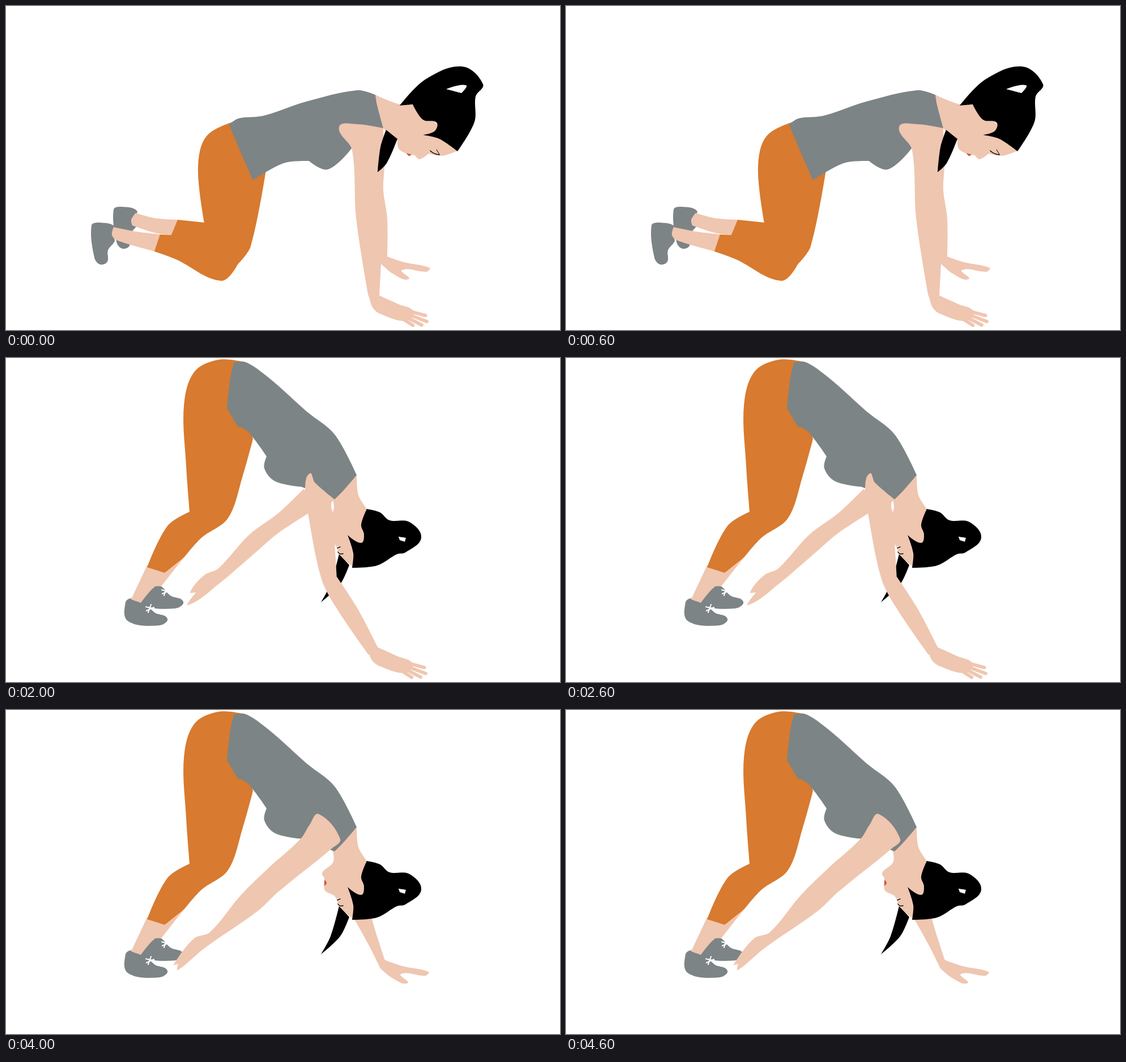
These frames come from a looping animation (978 px wide and 573 px high, 5 s). An HTML page:

```html
<!DOCTYPE html>
<html lang="en">
<head>
<meta charset="utf-8">
<title>Plank exercise</title>
<style>
html, body { margin: 0; width: 100%; height: 100%; overflow: hidden; background: #fff; }
svg { display: block; width: 978px; height: 573px; }
</style>
</head>
<body>
<svg id="stage" viewBox="0 0 978 573"></svg>
<script>
const GREY = '#7c8486', ORANGE = '#d87a2f', SKIN = '#efc6b0', BLACK = '#000', WHITE = '#fff', LIPS = '#c9573f';

// Closed smooth outline through a few "x,y" key points; a trailing "!" makes a corner.
function outline(text) {
  const pts = text.trim().split(/\s+/).map(s => {
    const [x, y] = s.replace('!', '').split(',').map(Number);
    return { x, y, corner: s.endsWith('!') };
  });
  const n = pts.length;
  const handle = (i, length) => {
    const p = pts[i], a = pts[(i + n - 1) % n], b = pts[(i + 1) % n];
    const k = p.corner ? 0 : length / 3 / Math.hypot(b.x - a.x, b.y - a.y);
    return `${p.x + (b.x - a.x) * k},${p.y + (b.y - a.y) * k}`;
  };
  const curves = pts.map((p, i) => {
    const j = (i + 1) % n, q = pts[j], length = Math.hypot(q.x - p.x, q.y - p.y);
    return `C${handle(i, length)} ${handle(j, -length)} ${q.x},${q.y}`;
  });
  return `M${pts[0].x},${pts[0].y}${curves.join('')}Z`;
}

const shape = (fill, pts) => `<path fill="${fill}" d="${outline(pts)}"/>`;
const line = (color, width, d) =>
  `<path fill="none" stroke="${color}" stroke-width="${width}" stroke-linecap="round" d="${d}"/>`;
const move = (transform, art) => `<g transform="${transform}">${art}</g>`;
const shift = (x, y, art) => move(`translate(${x} ${y})`, art);
const laces = (x, y) => shift(x, y, line(WHITE, 2, 'M-7,-3L7,1M-6,4L7,-2M2,-7L-3,7'));

// Four fingers fan out from the wrist, the middle ones longest.
function fingers(x, y) {
  return [0, 1, 2, 3].map(i => {
    const angle = (33 - 6 * i) * Math.PI / 180, reach = 73 + 19 * Math.sin(i * Math.PI / 4);
    const at = r => `${x + r * Math.cos(angle)},${y + r * Math.sin(angle)}`;
    return line(SKIN, 6, `M${at(48)}L${at(reach)}`);
  }).join('');
}
const nearHand = shape(SKIN, '638,508! 645,533 660,545 704,557 718,541 690,527 657,512!') + fingers(655, 525);
const farHand = shape(SKIN, '662,438! 671,443! 700,453 746,463 740,470 697,467 709,483 682,474 660,456!');
const hands = farHand + nearHand;

const sideHead =
  shape(SKIN, `652,157! 695,174 722,174! 768,215! 797,256! 770,265 746,261! 730,271 722,264! 707,261
    693,252 691,235! 670,220 640,190!`) +
  shape(BLACK, `695,176! 740,130 805,107 842,138 829,160 827,205 797,257! 765,235 736,228! 757,221
    760,206 736,201 718,174!`) +
  shape(WHITE, '777,147! 812,140 804,154!') +
  shape(LIPS, '707,260! 716,263! 711,265') +
  line(BLACK, 1.4, 'M749,256Q755,262 765,263') +
  line(BLACK, 1, 'M760,254L765,262');

const sideTorso = shape(GREY, `394,210! 410,199 455,194 530,169 620,149 652,157! 655,175 666,216! 610,252!
  568,289 535,274! 490,278 436,308! 420,272`);

const pair = (shoe, x, y, between) => shift(x, y, shoe) + between + shoe;

const kneeling =
  pair(shape(GREY, '151,388 165,383 192,390 187,404 192,415 180,432 179,452 166,457 156,445'), 39, -28,
    shape(SKIN, '229,366! 262,375 303,378! 293,405! 262,401 223,388! 221,378')) +
  shape(SKIN, '190,391! 230,399 273,404! 263,434! 195,414 187,404') +
  shape(ORANGE, `410,202! 355,229 339,285 350,383! 303,378! 292,405! 272,404! 262,434! 300,448 380,486
    409,457! 432,425 459,290!`) +
  sideHead + sideTorso +
  shape(SKIN, `588,214 620,209 666,216! 668,280 666,325 673,375 673,443! 662,457! 659,514! 640,514! 618,375
    611,255`) +
  shift(2, 0, hands) +
  shape(BLACK, '671,219! 691,235! 672,278 656,294! 661,250');

const plank =
  pair(shape(GREY, '33,395 45,383 66,380 71,403! 84,402 79,418 94,432 88,443 70,446 50,432') + laces(75, 419),
    41, -26, shape(SKIN, '108,358! 168,336! 125,368! 110,373!')) +
  shape(SKIN, '65,382! 126,363! 137,388! 72,404!') +
  shape(ORANGE, `437,218! 400,236 366,270! 310,298 275,315 225,312 175,332 125,360 133,388! 205,382 240,387
    275,378 370,368 471,325! 480,270!`) +
  shift(34.5, 7, sideHead) +
  move('translate(426 228) rotate(-2) translate(-394 -210)', sideTorso) +
  shape(BLACK, '698,228! 724,239! 703,290 680,309! 672,300!') +
  shape(SKIN, `625,223 660,212 703,217! 702,240 680,305 672,335 671,443! 661,457! 657,513! 638,513! 624,375
    642,249!`) +
  hands;

const pikeHead =
  shape(SKIN, `600,200! 619,205! 622,242 637,267! 640,320! 612,368! 590,350 580,329 563,319 562,298 558,288
    578,268 574,240!`) +
  shape(BLACK, `637,267! 660,273 677,287 712,290 733,318 705,344 690,347 655,367 611,371! 613,345 603,313!
    627,327 632,312 627,295`) +
  shape(WHITE, '693,316! 706,318! 704,325! 695,322!') +
  shape(BLACK, '588,347! 606,366! 590,400 556,432! 573,400') +
  shape(LIPS, '562,300! 566,306 562,311!') +
  shape(WHITE, '583,334! 591,332! 587,337!') +
  line(BLACK, 1.4, 'M585,336L590,334M586,343Q589,348 595,346');

const pikeBody =
  pair(shape(GREY, '211,432 222,425 245,433 262,450 285,461 270,473 215,465') + laces(254, 443), 28, -30, '') +
  shape(SKIN, '249,367! 221,427! 238,433! 262,405 274,404! 313,354! 303,350!') +
  shape(ORANGE, `420,7! 375,3 332,25 314,85 318,190 324,272! 285,297 249,370! 280,380! 315,352! 345,318
    392,283 418,208 436,143! 425,100!`) +
  pikeHead +
  shape(GREY, `403,7! 425,8 470,40 530,94 580,135 619,207! 596,234 580,250! 522,228! 475,218 456,195 460,174!
    427,130 408,120! 390,88! 397,30`);

const reachFar =
  shape(SKIN, `525,232! 480,275 430,312 375,372 350,384 325,414 336,414! 322,437 375,400 445,340 480,310
    535,274! 545,245!`) +
  pikeBody +
  shape(SKIN, `536,204 545,220 580,250! 574,258 577,273! 584,387! 620,442 657,513! 640,525! 580,437 556,388
    534,280 528,232`) +
  shape(WHITE, '575,254! 579,262 577,273! 574,264') +
  nearHand;

const reachNear =
  shape(SKIN, '615,370! 645,366! 655,400 669,443! 661,457! 640,415') +
  farHand + pikeBody +
  shape(SKIN, `552,184 536,203 520,228 465,278 415,327 360,393 332,404 296,450 304,449! 303,460 352,420
    445,355 480,322 575,245 590,228`);

const poses = [kneeling, plank, reachFar, plank, reachNear];
const stage = document.getElementById('stage');
stage.innerHTML = poses.map(art => `<g>${art}</g>`).join('');

const start = performance.now();
function tick() {
  const current = Math.floor((performance.now() - start) / 1000) % poses.length;
  [...stage.children].forEach((g, i) => g.setAttribute('visibility', i === current ? 'visible' : 'hidden'));
  requestAnimationFrame(tick);
}
tick();
</script>
</body>
</html>
```
